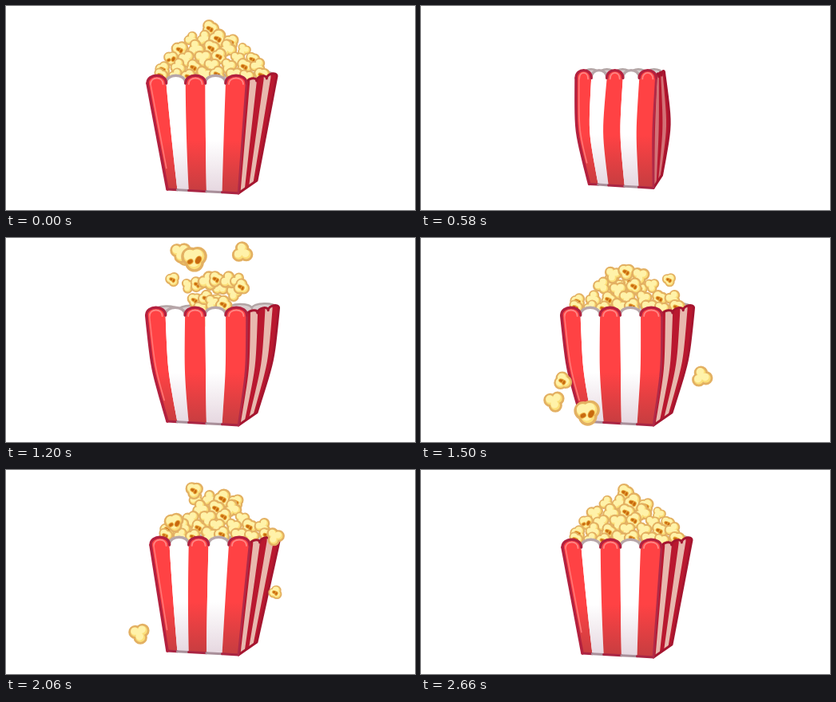
An HTML page with a canvas for the animation above (2.7 s loop, 512 by 256 pixels).

```html
<!DOCTYPE html>
<html lang="en">
<head>
<meta charset="utf-8">
<title>Popcorn</title>
<style>
html, body { margin: 0; width: 100%; height: 100%; overflow: hidden; background: #fff; }
canvas { display: block; width: 512px; height: 256px; }
</style>
</head>
<body>
<canvas id="stage" width="512" height="256"></canvas>
<script>
const ctx = document.getElementById('stage').getContext('2d');
const LOOP = 2700, SWELL = 260, BURST = 1060;

const lerp = (a, b, p) => a + (b - a) * p;
const clamp = v => Math.max(0, Math.min(1, v));
const ease = (t, a, b) => { const p = clamp((t - a) / (b - a)); return p * p * (3 - 2 * p); };
const arc = p => 4 * p * (1 - p);
const rnd = (i, k) => { const s = Math.sin(i * 12.9898 + k * 78.233) * 43758.5; return s - Math.floor(s); };

// Stripe borders of the front, and the pale bands of the side
const TOP = [0, .19, .385, .585, .79, 1];
const BOTTOM = [0, .14, .3, .55, .77, 1];
const SIDE = [[.11, .34], [.57, .8]];

// Kernels that spill on the ground, by their place in the pile
const SPILL = {
  0: { x: 171, y: 224, r: 12, kind: 1, land: 1540, back: 1890 },
  5: { x: 167, y: 205, r: 14, kind: 0, land: 1500, back: 2350 },
  9: { x: 357, y: 207, r: 14, kind: 0, land: 1530, back: 1970 },
  10: { x: 208, y: 220, r: 17, kind: 2, land: 1490, back: 1930 },
  15: { x: 342, y: 219, r: 9, kind: 1, land: 1700, back: 2020 }
};

// A mound of rows that widen downwards, back row first
function makePile() {
  const pile = [];
  for (let row = 0; row < 6; row++) {
    const n = row ? row + 3 : 1, y = 30 + row * 11.3;
    const half = 64 * (1 - ((88 - y) / 62) ** 1.8);
    for (let j = 0; j < n; j++) {
      const i = pile.length, u = n > 1 ? 2 * j / (n - 1) - 1 : 0;
      pile.push({
        row, x: 257 + u * half + 4 * (rnd(i, 1) - .5), y: y + 4 * (rnd(i, 2) - .5) + 2 * u * u,
        r: 11 + 2.5 * rnd(i, 3) - 2 * Math.abs(u), kind: rnd(i, 4) < .45 ? 1 : 0, turn: 6.3 * rnd(i, 5)
      });
    }
  }
  return pile;
}
const PILE = makePile();

// The empty bag closes, swells twice, bursts open wide, then leans a little
function poseAt(t) {
  const closed = ease(t, 40, SWELL) - ease(t, BURST, BURST + 120);
  const swell = t > SWELL && t < BURST ? (1 - Math.cos((t - SWELL) / 200 * Math.PI)) / 2 : 0;
  const wide = ease(t, BURST, BURST + 120) - ease(t, 1500, 1660);
  const lean = ease(t, 1640, 1840) - ease(t, 2400, 2640);
  const pinch = closed * (.85 + .3 * swell) - .07 * wide;
  const narrow = closed * (1 - .65 * swell);
  const bulge = closed * (.35 + .65 * swell) + .4 * wide;
  const lift = 10 * closed * (1 - swell) + 3 * lean;
  const edge = (x0, y0, x1, y1, bend) => ({
    a: { x: x0 + 4 * lean, y: y0 - lift }, b: { x: x1, y: y1 - lift }, bend
  });
  return {
    lean, lift,
    left: edge(177 + 18 * pinch, 97, 202 + 11 * narrow, 230, -12 * bulge),
    mid: edge(301 - 7 * pinch, 97, 291, 235, 4 * wide - 6 * closed * swell),
    right: edge(339 - 36 * pinch, 88 + 4 * pinch, 314 - 16 * narrow, 219, 14 * bulge)
  };
}

function onEdge({ a, b, bend }, v) {
  const k = (1.044 - Math.hypot(2 * v - 1, .3)) / .744;
  return { x: lerp(a.x, b.x, v) + bend * k, y: lerp(a.y, b.y, v) };
}
function onFace(l, r, u, v) {
  const p = onEdge(l, v), q = onEdge(r, v);
  return { x: lerp(p.x, q.x, u), y: lerp(p.y, q.y, u) };
}
function run(l, r, u0, u1, from, to) {
  for (let s = 0; s <= 18; s++) {
    const v = lerp(from, to, s / 18), q = onFace(l, r, lerp(u0, u1, v), v);
    ctx.lineTo(q.x, q.y);
  }
}
function bump(a, b, h) {
  ctx.lineTo(a.x, a.y);
  ctx.bezierCurveTo(a.x, a.y - h, b.x, b.y - h, b.x, b.y);
}
function bumps(a, b, n, h) {
  const at = i => ({ x: lerp(a.x, b.x, i / n), y: lerp(a.y, b.y, i / n) });
  for (let i = 0; i < n; i++) bump(at(i), at(i + 1), h);
}
function fill(color, path) {
  ctx.beginPath(); path(); ctx.closePath();
  ctx.fillStyle = color; ctx.fill();
}
function stroke(color, width, path) {
  ctx.beginPath(); path();
  ctx.strokeStyle = color; ctx.lineWidth = width; ctx.stroke();
}

function drawBack({ left, mid, right }) {
  const a = { x: left.a.x + 9, y: left.a.y - 5 }, b = { x: right.a.x - 3, y: right.a.y };
  const rim = () => bumps(a, b, 5, 8);
  fill('#d8cdcd', () => { rim(); ctx.lineTo(mid.a.x, mid.a.y); ctx.lineTo(left.a.x, left.a.y); });
  stroke('#b3a5a5', 2.5, rim);
}

function drawSide(l, r) {
  const rim = () => bumps(l.a, r.a, 3, 6);
  const face = () => { rim(); run(l, r, 1, 1, 0, 1); run(l, r, 0, 0, 1, 0); };
  fill('#b9182f', face);
  ctx.save();
  ctx.beginPath(); face(); ctx.clip();
  ctx.globalAlpha = clamp((onEdge(r, .5).x - onEdge(l, .5).x - 16) / 8);
  for (const [u0, u1] of SIDE) {
    fill('#e8b8ae', () => {
      const p = onFace(l, r, u0, 0), q = onFace(l, r, u1, 0);
      ctx.lineTo(p.x, p.y - 6); ctx.lineTo(q.x, q.y - 6);
      run(l, r, u1, u1, 0, 1); run(l, r, u0, u0, 1, 0);
    });
  }
  ctx.restore();
  stroke('#a5152f', 3, () => { rim(); run(l, r, 1, 1, 0, 1); ctx.lineTo(l.b.x, l.b.y); });
}

function drawFront(l, r) {
  const top = i => onFace(l, r, TOP[i], 0), low = i => onFace(l, r, BOTTOM[i], 1);
  const shade = (a, b) => {
    const g = ctx.createLinearGradient(0, l.a.y, 0, r.b.y);
    g.addColorStop(.52, a); g.addColorStop(1, b);
    return g;
  };
  const red = shade('#ff4244', '#c53d40'), white = shade('#ffffff', '#e5d6df');
  for (let i = 0; i < 5; i++) {
    fill(i % 2 ? white : red, () => {
      bump(top(i), top(i + 1), 13);
      run(l, r, TOP[i + 1], BOTTOM[i + 1], 0, 1);
      run(l, r, TOP[i], BOTTOM[i], 1, 0);
    });
  }
  for (let i = 0; i < 5; i += 2) {
    const a = top(i), b = top(i + 1);
    stroke('#ff8583', 1.8, () => bump({ x: a.x + 4, y: a.y + 1 }, { x: b.x - 4, y: b.y + 1 }, 10));
  }
  ctx.save();
  ctx.translate(3.8, 0);
  stroke('#ff7777', 1.6, () => run(l, r, 0, 0, 0, .8));
  ctx.restore();
  for (let i = 0; i < 5; i++) {
    const a = low(i), b = low(i + 1);
    stroke(i % 2 ? '#a98f9a' : '#a92543', 3, () => { ctx.moveTo(a.x, a.y); ctx.lineTo(b.x, b.y); });
  }
  stroke('#b02a48', 2.6, () => run(l, r, 1, 1, 0, 1));
  stroke('#b3213f', 3.6, () => run(l, r, 0, 0, 0, 1));
  for (const i of [1, 3, 0, 2, 4])
    stroke(i % 2 ? '#b7a6a9' : '#b3213f', 3.4, () => bump(top(i), top(i + 1), 13));
}

function drawKernel({ x, y, r, kind, turn }) {
  const spread = kind ? .3 : .38;
  const blob = (color, inset, dx, dy) => fill(color, () => {
    for (let i = 0; i < 3; i++) {
      const a = turn + i * 2.1, s = Math.max(1, r * (1 - spread) - inset);
      const px = dx + Math.cos(a) * spread * r, py = dy + Math.sin(a) * spread * r;
      ctx.moveTo(px + s, py);
      ctx.arc(px, py, s, 0, 7);
    }
    const core = Math.max(1, .6 * r - inset);
    ctx.moveTo(dx + core, dy);
    ctx.arc(dx, dy, core, 0, 7);
  });
  const crack = (cx, cy, w, h, a) => {
    const oval = grow => () => ctx.ellipse(cx * r, cy * r, w * r + grow, h * r + grow, a, 0, 7);
    fill('#e9a93c', oval(1));
    fill('#c8690f', oval(0));
  };
  ctx.save();
  ctx.translate(x, y);
  blob('#e3b062', 0, 0, 0);
  blob('#fbdf79', .2 * r, 0, 0);
  blob('#fff2a9', .28 * r, -.07 * r, -.09 * r);
  if (kind === 1) { crack(-.1, 0, .28, .15, .4); crack(.12, .16, .13, .2, .4); }
  if (kind === 2) { crack(-.3, .24, .2, .14, -.5); crack(.3, .12, .18, .28, .5); }
  ctx.restore();
}

function kernelAt(i, t, pose) {
  const home = PILE[i], spill = SPILL[i];
  const k = { ...home, front: false };
  const mouth = (pose.left.a.x + pose.right.a.x) / 2;
  const hx = home.x + 6 * pose.lean, hy = home.y - 1.6 * 3 * pose.lean;

  if (t < BURST - 70) {  // sink into the bag, top rows last
    const s = Math.max(0, t - Math.max(15, 205 - 60 * home.row - 30 * rnd(i, 6)));
    k.x = lerp(home.x, mouth, clamp(s / 280) ** 2);
    k.y += .002 * s * s - .05 * s;
    k.r *= 1 - .4 * clamp(s / 120);
    k.turn += s * .004;
    return k.y < 112 ? k : null;
  }
  if (!spill) {  // pop up into the pile, bottom rows first
    const p = clamp((t - BURST + 50 - (5 - home.row) * 75 - 60 * rnd(i, 7)) / 330);
    if (!p) return null;
    k.x = lerp(mouth, hx, Math.sin(p * Math.PI / 2));
    k.y = lerp(112, hy, p) - (.4 + .3 * rnd(i, 8)) * ((112 + hy) / 2 - 30) * arc(p);
    k.turn -= (1 - p) * 2;
    return k;
  }
  const p = clamp((t - spill.land + 530) / 530);
  if (!p) return null;
  if (t < spill.back) {  // thrown over the rim
    k.x = lerp(mouth, spill.x, p);
    k.y = lerp(100, spill.y, p) - 130 * arc(p) - 4 * arc(clamp((t - spill.land) / 130));
    k.turn += (1 - p) * 4;
    k.r = spill.r; k.kind = spill.kind;
    k.front = p > .4;
    return k;
  }
  const q = clamp((t - spill.back) / 240);  // hop back on the pile
  k.x = lerp(spill.x, hx, q);
  k.y = lerp(spill.y, hy, q) - 68 * arc(q);
  k.r = lerp(spill.r, home.r, q);
  k.kind = spill.kind;
  k.turn += 2 * Math.sin(q * Math.PI);
  k.front = q < .85;
  return k;
}

function draw(t) {
  const pose = poseAt(t);
  const kernels = PILE.map((_, i) => kernelAt(i, t, pose)).filter(Boolean);
  ctx.fillStyle = '#fff';
  ctx.fillRect(0, 0, 512, 256);
  drawBack(pose);
  kernels.filter(k => !k.front).forEach(drawKernel);
  drawSide(pose.mid, pose.right);
  drawFront(pose.left, pose.mid);
  kernels.filter(k => k.front).forEach(drawKernel);
}

for (const i in SPILL) if (SPILL[i].kind === 2) PILE[i].kind = 2;
ctx.lineJoin = ctx.lineCap = 'round';
const begin = performance.now();
function tick() {
  draw((performance.now() - begin) % LOOP);
  requestAnimationFrame(tick);
}
tick();
</script>
</body>
</html>
```
